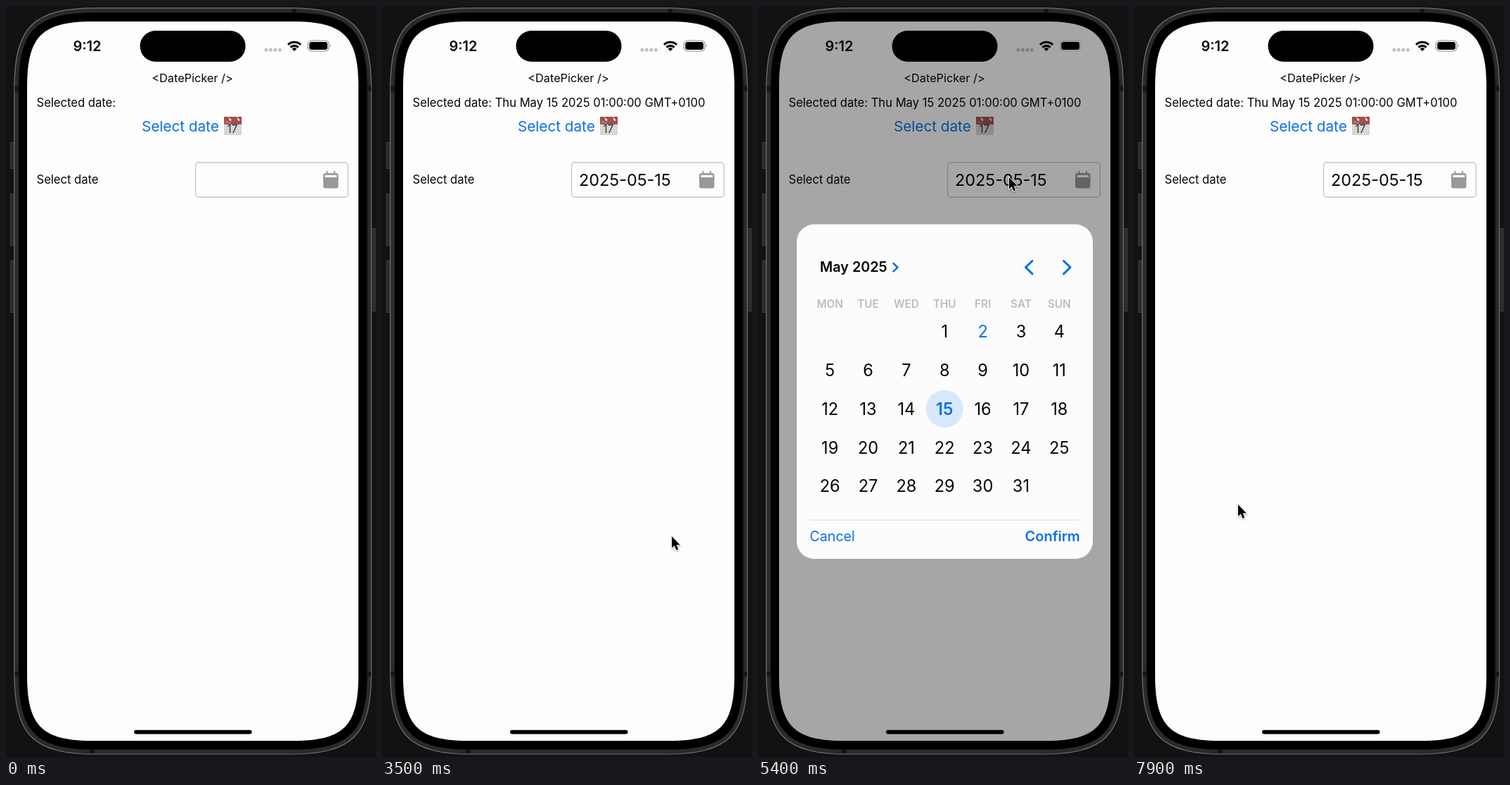
Write an HTML page that moves like this. It is 526 by 1065 pixels and loops after 8000 ms.

```html
<!DOCTYPE html>
<html lang="en">
<head>
<meta charset="utf-8">
<title>DatePicker</title>
<style>
  html, body { margin: 0; width: 100%; height: 100%; overflow: hidden; background: #121212; }
  svg { display: block; width: 526px; height: 1065px; }
  text { font: 16.6px Inter, Roboto, sans-serif; font-optical-sizing: none; fill: #050505; white-space: pre; }
  .mid { text-anchor: middle; }
  .end { text-anchor: end; }
  .bold { font-weight: 600; }
  .link { fill: #0a6fea; }
  .day { font-size: 23.6px; }
  .week { font-size: 15.3px; fill: #bcbcbe; }
  .arrow { fill: none; stroke: #0a6fea; stroke-width: 3; stroke-linecap: round; stroke-linejoin: round; }
</style>
</head>
<body>
<svg viewBox="0 0 526 1065">
  <defs>
    <filter id="shadow" x="-50%" y="-50%" width="200%" height="200%">
      <feDropShadow dx="0" dy="1.5" stdDeviation="1.2" flood-opacity=".35"/>
    </filter>
  </defs>

  <g id="phone">
    <g fill="#2b2b2b" stroke="#484848" stroke-width=".8">
      <rect x="6.5" y="193.5" width="7" height="37"/>
      <rect x="6.5" y="266.5" width="7" height="73"/>
      <rect x="6.5" y="361.5" width="7" height="73"/>
      <rect x="517" y="315.5" width="8" height="117"/>
    </g>
  </g>
  <g fill="#161616">
    <path d="M12.5 113h5v8h-5zM12.5 944h5v7h-5zM514 113h5v8h-5zM514 944h5v7h-5zM406 4h7v5h-7zM119 1055h7v5h-7z"/>
  </g>
  <g id="screen"></g>

  <g id="page">
    <text class="mid" x="265" y="108.3" style="font-size:16.3px">&lt;DatePicker /&gt;</text>
    <text id="chosen" x="43.5" y="143"></text>
    <g id="button">
      <text class="link" x="193" y="178" style="font-size:20.7px">Select date</text>
      <path fill="#d7d7d7" d="M310 157h25v26h-25z"/>
      <path fill="#a3504d" d="M310 157h25v11h-25z"/>
      <path fill="#eee" d="M316 157l5 5-3 1zM328 157l5 5-3 1z"/>
      <path fill="none" stroke="#d9aaa8" stroke-width=".8" d="M312 166l1.500-3 1.500 3M317 164v2h2"/>
      <text class="mid" x="321.700" y="180" style="font-size:15.500px;fill:#333">17</text>
    </g>
    <text x="43.5" y="252">Select date</text>
    <rect x="269.600" y="222" width="216.600" height="49" rx="4" fill="none" stroke="#c6c6c6" stroke-width="1.300"/>
    <text id="field" x="280" y="255" style="font-size:23.4px"></text>
    <rect x="451" y="237" width="21.500" height="21.500" rx="3" fill="#999"/>
    <path d="M456.500 235v4M467 235v4" stroke="#999" stroke-width="2.200" stroke-linecap="round"/>
    <rect x="453.500" y="239.800" width="16.500" height="3.200" fill="#fdfdfd"/>
    <g fill="#bebebf">
      <rect x="367.500" y="60" width="4.600" height="4.400" rx="1.500"/>
      <rect x="374" y="60" width="4.600" height="4.400" rx="1.500"/>
      <rect x="380.500" y="60" width="4.600" height="4.400" rx="1.500"/>
      <rect x="387" y="60" width="4.600" height="4.400" rx="1.500"/>
    </g>
  </g>

  <g id="modal">
    <g id="shade"></g>
    <rect x="55" y="309.500" width="421" height="474.500" rx="25" fill="#fcfcfc"/>
    <text class="bold" x="88" y="377.300" style="font-size:19.800px">May 2025</text>
    <path class="arrow" d="M192.500 365l6 5.700-6 5.700" style="stroke-width:2.600"/>
    <path class="arrow" d="M390 361.500l-9.500 9.200 9.500 9.200M434.500 361.500l9.500 9.200-9.500 9.200"/>
    <circle id="mark" r="26.500"/>
    <g id="days"></g>
    <path d="M74 729h383" stroke="#d9d9da"/>
    <text class="link" x="73.500" y="758.700" style="font-size:19.600px">Cancel</text>
    <text class="link bold end" x="457.800" y="758.700" style="font-size:19.950px">Confirm</text>
  </g>

  <text class="bold mid" x="115.500" y="64" style="font-size:20px">9:12</text>
  <rect x="190.500" y="35" width="150" height="44" rx="22"/>
  <g fill="none" stroke="#000" stroke-width="3.100">
    <path d="M401 54.800a13 13 0 0 1 18 0M404.400 58.700a8 8 0 0 1 11.200 0"/>
  </g>
  <path d="M410 64l-3.300-3.300a4.700 4.700 0 0 1 6.600 0z"/>
  <rect x="429.300" y="49" width="29.600" height="15" rx="4.600" fill="none" stroke="#8e8e90" stroke-width="1.200"/>
  <rect x="431.200" y="50.900" width="25.800" height="11.200" rx="3"/>
  <path d="M460.500 54q1.800 2.500 0 5z" fill="#8e8e90"/>
  <rect x="182" y="1026.800" width="167.500" height="5.600" rx="2.800"/>

  <g id="cursor" filter="url(#shadow)">
    <path d="M0 0V16.500L3.800 13.200 6.400 19.400 9.200 18.200 6.600 12.200H11.800Z" stroke="#fff" stroke-width="1.600" paint-order="stroke"/>
  </g>
</svg>

<script>
const LOOP = 8000, STEP = 100;
const $ = id => document.getElementById(id);

function add(parent, tag, attrs, text = '') {
  const el = document.createElementNS('http://www.w3.org/2000/svg', tag);
  for (const name in attrs) el.setAttribute(name, attrs[name]);
  el.textContent = text;
  return parent.appendChild(el);
}

// Rectangle with continuous-curvature corners reaching e along each edge.
function squircle(l, t, r, b, e) {
  const c = e * 0.225;
  return `M${l + e} ${t}H${r - e}C${r - c} ${t} ${r} ${t + c} ${r} ${t + e}` +
    `V${b - e}C${r} ${b - c} ${r - c} ${b} ${r - e} ${b}` +
    `H${l + e}C${l + c} ${b} ${l} ${b - c} ${l} ${b - e}` +
    `V${t + e}C${l} ${t + c} ${l + c} ${t} ${l + e} ${t}Z`;
}

const screenPath = squircle(30, 22, 501, 1042, 93);
add($('phone'), 'path', { d: squircle(11.8, 2.8, 519.4, 1061, 117), fill: '#2a2a2a', stroke: '#727272', 'stroke-width': 1.2 });
add($('screen'), 'path', { d: squircle(18, 9.5, 513.5, 1054.5, 108), fill: '#000' });
add($('screen'), 'path', { d: screenPath, fill: '#fdfdfd' });
add($('shade'), 'path', { d: screenPath, fill: '#000003', 'fill-opacity': 0.345 });

const colX = i => 102.2 + 54.35 * i;
const rowY = i => 461.7 + 54.75 * i;
const place = day => [colX((day + 2) % 7), rowY(Math.floor((day + 2) / 7))];

['MON', 'TUE', 'WED', 'THU', 'FRI', 'SAT', 'SUN'].forEach((name, i) =>
  add($('days'), 'text', { class: 'week mid bold', x: colX(i), y: 428.4 }, name));
const days = Array.from({ length: 31 }, (_, i) => {
  const [x, y] = place(i + 1);
  return add($('days'), 'text', { class: 'day mid', x, y: y + 8.6 }, i + 1);
});

const TODAY = 2;
function select(day) {
  const [x, y] = place(day);
  const mark = $('mark');
  mark.setAttribute('cx', x);
  mark.setAttribute('cy', y);
  mark.setAttribute('fill', day === TODAY ? '#0070ff' : '#d8e8fc');
  days.forEach((el, i) => {
    const chosen = i + 1 === day, today = i + 1 === TODAY;
    el.style.fontWeight = chosen ? 600 : 400;
    el.style.fill = chosen && today ? '#fff' : chosen || today ? '#0a6fea' : '';
  });
}

const ease = p => p * p * (3 - 2 * p);

// Eased value at time t along keys of [time, ...values].
function track(keys, t) {
  const next = keys.findIndex(key => key[0] > t);
  if (next < 0) return keys.at(-1).slice(1);
  if (next === 0) return keys[0].slice(1);
  const a = keys[next - 1], b = keys[next];
  const p = ease((t - a[0]) / (b[0] - a[0]));
  return a.slice(1).map((v, i) => v + (b[i + 1] - v) * p);
}

const pointer = [
  [0, 522, 530], [700, 260, 175.500],
  [1300, 260, 175.500], [2400, 263.500, 570.500],
  [2700, 263.500, 570.500], [3100, 412, 752],
  [4000, 412, 752], [4900, 357, 243],
  [5700, 357, 243], [6200, 318, 624],
  [6300, 318, 624], [6500, 243, 667], [6900, 118, 753],
  [7600, 118, 753], [7900, 148, 707]
];
const fade = [
  [860, 0], [980, 1], [3150, 1], [3350, 0],
  [5250, 0], [5370, 1], [7650, 1], [7850, 0]
];
const press = [[800, 1], [860, 0.45], [900, 0.45], [1150, 1]];

function draw(t) {
  const [x, y] = track(pointer, t);
  $('cursor').setAttribute('transform', `translate(${x} ${y})`);
  $('cursor').style.display = t < 100 ? 'none' : '';
  $('modal').style.opacity = track(fade, t)[0];
  $('button').style.opacity = track(press, t)[0];
  select(t < 2700 ? TODAY : t < 6300 ? 15 : 23);
  const confirmed = t >= 3200;
  $('chosen').textContent = 'Selected date:' + (confirmed ? ' Thu May 15 2025 01:00:00 GMT+0100' : '');
  $('field').textContent = confirmed ? '2025-05-15' : '';
}

const start = performance.now();
function frame() {
  const t = (performance.now() - start) % LOOP;
  draw(Math.floor(t / STEP) * STEP);
  requestAnimationFrame(frame);
}
frame();
</script>
</body>
</html>
```
